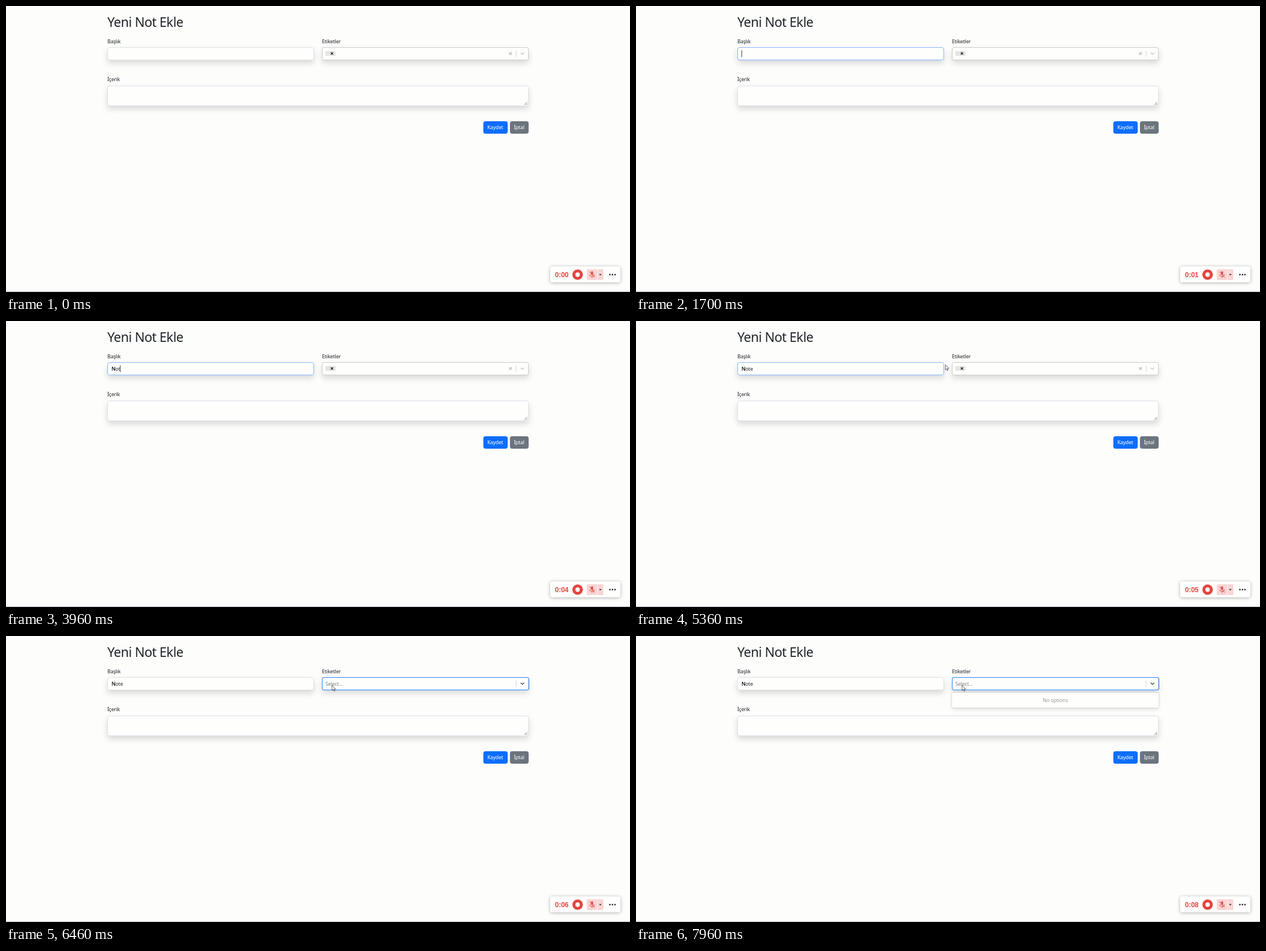
An HTML page that plays this animation: 1102x508 px, repeating every 8000 ms.

```html
<!DOCTYPE html>
<html lang="tr">
<head>
<meta charset="utf-8">
<title>Yeni Not Ekle</title>
<style>
html, body { margin: 0; width: 100%; height: 100%; overflow: hidden; background: #fdfdfc; }
.stage { position: absolute; left: 0; top: 0; width: 1102px; height: 508px; overflow: hidden; }
.stage > * { position: absolute; box-sizing: border-box; }
svg { left: 0; top: 0; }

/* Form boxes */
.field { background: #fefefd; border: 1px solid #dee2e6; border-radius: 4px;
  box-shadow: 0 5.3px 10.7px rgba(0,0,0,.15); }
.title { left: 179px; top: 73px; width: 365px; height: 23px; animation: focus 8s linear infinite; }
.tags { left: 558px; top: 73px; width: 365px; height: 23px; border-color: #ccc; border-radius: 3px; }
.tags-focus { left: 557.5px; top: 72.5px; width: 366px; height: 23.5px;
  border: 1.6px solid #2684ff; border-radius: 3px; }
.content { left: 179px; top: 140.5px; width: 744px; height: 36px; }
.btn { top: 204px; height: 22px; border-radius: 4px; }
.save { left: 843px; width: 43px; background: #0d6efd; }
.cancel { left: 890px; width: 33px; background: #6c757d; }
.menu { left: 558px; top: 99.5px; width: 365px; height: 27.5px; background: #fefefd; border-radius: 3px;
  box-shadow: 0 0 0 .7px rgba(0,0,0,.12), 0 2.7px 7.3px rgba(0,0,0,.12); }
.recorder { left: 961px; top: 461px; width: 124px; height: 28px; background: #fff; border-radius: 4px;
  box-shadow: 0 1px 6px rgba(0,0,0,.3); }
.edge { left: 0; top: 506px; width: 1102px; height: 2px; background: #08080c; }

/* Text */
text { font: 9px "Noto Sans", "Open Sans", sans-serif; letter-spacing: -.022em; fill: #212529; }
.head { font-size: 23px; font-weight: 500; }
.light { fill: #fff; }
.hint { fill: #808080; }
.none { fill: #999; }
.time { font: bold 12px "Liberation Sans", Arial, sans-serif; letter-spacing: 0; fill: #e2463f; }
.line { fill: none; stroke-width: 1.3; }

/* Visibility: all steps are hard */
.step, .sec { animation: 8s step-end infinite; }
.unpicked { animation-name: unpicked; }
.picked { animation-name: picked; }
.open { animation-name: open; }
.hover { animation-name: hover; }
.caret { animation-name: blink, caret; }
.n { animation-name: n; }
.o { animation-name: o; }
.t { animation-name: t; }
.e { animation-name: e; }
.beam { animation-name: beam; }
.arrow { animation-name: arrow; }
.sec { opacity: 0; animation-name: sec; animation-delay: calc(var(--s) * 1s - 70ms); }
.first { animation-name: first; }
.last { animation-name: last; }
.pointer { animation: move 8s linear infinite; }

@keyframes focus {
  0%, 19.125% { border-color: #dee2e6; }
  21%, 78.75% { border-color: #86b7fe; }
  80.6%, 100% { border-color: #dee2e6; }
}
@keyframes unpicked { 0% { opacity: 1; } 78.75% { opacity: 0; } }
@keyframes picked { 0% { opacity: 0; } 78.75% { opacity: 1; } }
@keyframes open { 0% { opacity: 0; } 82.5% { opacity: 1; } }
@keyframes hover { 0% { opacity: 0; } 72% { opacity: 1; } 78.75% { opacity: 0; } }
@keyframes blink {
  0%, 25.375%, 37.875%, 62%, 74.5% { opacity: 0; }
  19.125%, 32.5%, 40%, 68.25% { opacity: 1; }
}
@keyframes caret {
  0% { transform: none; }
  40% { transform: translateX(6.6px); }
  46.625% { transform: translateX(12px); }
  49.125% { transform: translateX(15px); }
  55.75% { transform: translateX(20.5px); }
}
@keyframes n { 0% { opacity: 0; } 40% { opacity: 1; } }
@keyframes o { 0% { opacity: 0; } 46.625% { opacity: 1; } }
@keyframes t { 0% { opacity: 0; } 49.125% { opacity: 1; } }
@keyframes e { 0% { opacity: 0; } 55.75% { opacity: 1; } }
@keyframes sec { 0% { opacity: 1; } 12.5% { opacity: 0; } }
@keyframes first { 0% { opacity: 1; } 11.625% { opacity: 0; } }
@keyframes last { 0% { opacity: 0; } 99.125% { opacity: 1; } }
@keyframes beam {
  0%, 13.9%, 66% { opacity: 0; }
  9.125%, 57.5% { opacity: 1; }
}
@keyframes arrow { 0%, 72% { opacity: 0; } 66%, 78.75% { opacity: 1; } }
@keyframes move {
  0%, 9.125% { transform: translate(341px, 72px); }
  11.6%, 57.5% { transform: translate(340.5px, 77px); animation-timing-function: ease-in-out; }
  65.75% { transform: translate(544px, 77px); }
  67% { transform: translate(546px, 77px); }
  72% { transform: translate(569.5px, 84px); }
  75%, 78% { transform: translate(574px, 85.5px); }
  79.5%, 100% { transform: translate(575.5px, 87px); }
}
</style>
</head>
<body>
<div class="stage">
  <div class="field title"></div>
  <div class="field tags"></div>
  <div class="tags-focus step picked"></div>
  <div class="field content"></div>
  <div class="btn save"></div>
  <div class="btn cancel"></div>
  <div class="menu step open"></div>
  <div class="recorder"></div>
  <div class="edge"></div>

  <svg width="1102" height="508" viewBox="0 0 1102 508">
    <text class="head" x="179" y="37">Yeni Not Ekle</text>
    <text x="179" y="65.5">Başlık</text>
    <text x="558" y="65.5">Etiketler</text>
    <text x="179" y="133">İçerik</text>
    <text class="light" x="850" y="218.3">Kaydet</text>
    <text class="light" x="897" y="218.3">İptal</text>
    <path class="line" d="M915.5 175l5-5M918.5 175l2-2" stroke="#555" style="stroke-width:.8"/>

    <!-- Typed title -->
    <text x="186.5" y="87.7"><tspan class="step n">N</tspan></text>
    <text class="step n" x="186.5" y="87.7">N</text>
    <text class="step o" x="193.2" y="87.7">o</text>
    <text class="step t" x="198.5" y="87.7">t</text>
    <text class="step e" x="201.8" y="87.7">e</text>
    <rect class="step caret" x="186.3" y="78.5" width="1" height="12" fill="#333"/>

    <!-- Tag picker -->
    <path d="M901 78.5V90" stroke="#d4d4d4"/>
    <g class="step unpicked">
      <rect x="564" y="79.7" width="18" height="8.6" rx="1" fill="#e5e5e1"/>
      <path class="line" d="M573.6 82l4 4M577.6 82l-4 4" stroke="#222"/>
      <path class="line" d="M888.5 81.7l4.8 4.8M893.3 81.7l-4.8 4.8" stroke="#bbb"/>
      <path class="line" d="M909 82.7l3 3 3-3" stroke="#c4c4c4"/>
    </g>
    <g class="step hover">
      <rect x="569" y="79.7" width="13" height="8.6" rx="1" fill="#ffbdad"/>
      <path class="line" d="M573.6 82l4 4M577.6 82l-4 4" stroke="#de350b"/>
    </g>
    <g class="step picked">
      <text class="hint" x="564" y="87.7">Select...</text>
      <path class="line" d="M909 82.7l3 3 3-3" stroke="#555" style="stroke-width:1.6"/>
    </g>
    <text class="none step open" x="740.5" y="117" text-anchor="middle">No options</text>

    <!-- Recorder -->
    <g>
      <text class="time sec first" x="969.5" y="479.6">0:00</text>
      <text class="time sec" style="--s:1" x="969.5" y="479.6">0:01</text>
      <text class="time sec" style="--s:2" x="969.5" y="479.6">0:02</text>
      <text class="time sec" style="--s:3" x="969.5" y="479.6">0:03</text>
      <text class="time sec" style="--s:4" x="969.5" y="479.6">0:04</text>
      <text class="time sec" style="--s:5" x="969.5" y="479.6">0:05</text>
      <text class="time sec" style="--s:6" x="969.5" y="479.6">0:06</text>
      <text class="time sec" style="--s:7" x="969.5" y="479.6">0:07</text>
      <text class="time sec last" x="969.5" y="479.6">0:08</text>
    </g>
    <circle cx="1009.5" cy="475.5" r="6.6" fill="#fff" stroke="#e2463f" stroke-width="5.4"/>
    <rect x="1025.5" y="466" width="29.5" height="19" rx="2" fill="#f9d5d4"/>
    <path d="M1044.5 466v19" stroke="#fdeeee"/>
    <rect x="1033" y="469.5" width="4" height="7" rx="2" fill="#dc5a54"/>
    <path class="line" d="M1031 475c0 5 8 5 8 0M1035 479v2.5M1030.5 470l9 10.5" stroke="#dc5a54" style="stroke-width:1.1"/>
    <path d="M1047.2 474.5h4.8l-2.4 2.6z" fill="#333"/>
    <g fill="#333">
      <circle cx="1066.5" cy="475.5" r="1.4"/>
      <circle cx="1071" cy="475.5" r="1.4"/>
      <circle cx="1075.5" cy="475.5" r="1.4"/>
    </g>

    <!-- Pointer -->
    <g class="pointer" stroke="#333" stroke-width=".8" stroke-linejoin="round">
      <path class="step beam" d="M-2.5-6.5h2l.5.5.5-.5h2M0-6V6M-2.5 6.5h2L0 6l.5.5h2" fill="none"/>
      <path class="step arrow" d="M.3.3V9.3L2.4 7.4l1.5 3.3 1.3-.6-1.4-3.2h2.9z" fill="#fff"/>
      <path class="step hover" d="M-.8.8Q0-.3.8.8V4.2L4 5q1 .3.9 1.4L4.3 9v2H-.3V9.6L-2.6 6.8q0-1.2 1.8.2z" fill="#fff"/>
    </g>
  </svg>
</div>
</body>
</html>
```
